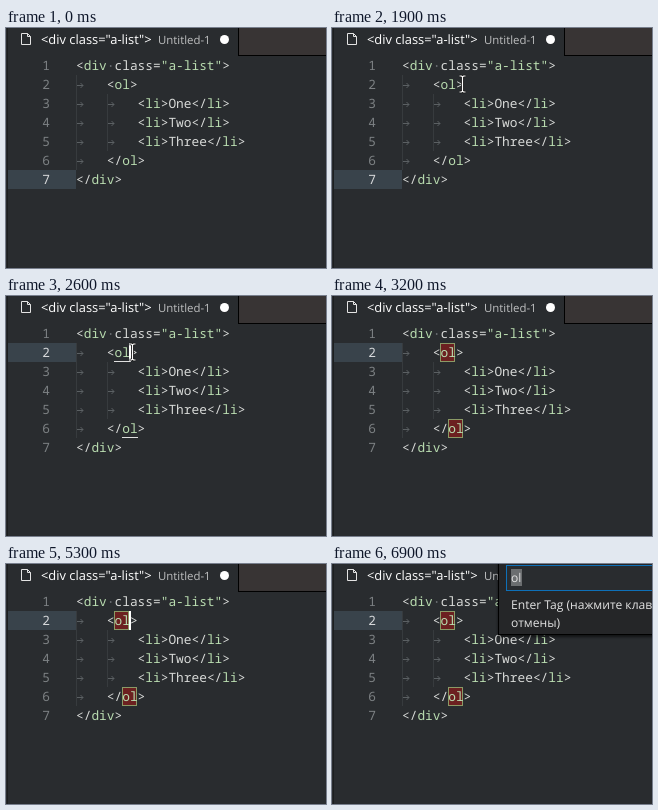
Write an HTML page that moves like this. It is 320x240 px and loops after 8 s.

```html
<!DOCTYPE html>
<html lang="en">
<head>
<meta charset="utf-8">
<title>Rename paired tag</title>
<style>
  html, body { margin: 0; width: 100%; height: 100%; overflow: hidden; background: #292c2f; }
  svg { display: block; width: 320px; height: 240px; }
  text { white-space: pre; text-rendering: geometricPrecision; }
  rect { shape-rendering: crispEdges; }
  .ui { font-family: "Open Sans", "Noto Sans", sans-serif; fill: #e2e2e2; }
  .code { font: 12.83px "Noto Sans Mono", "DejaVu Sans Mono", monospace; fill: #d8dad8; }
  .code .tag { fill: #b9dcb0; }
  .code.num { fill: #7c8083; text-anchor: end; }
  .code.num.on { fill: #d6d8da; }
  .guide { fill: #373b3e; }
  .ws { fill: none; stroke: #5b6063; }
</style>
</head>
<body>
<svg id="stage" viewBox="0 0 320 240">
  <defs>
    <filter id="shadow" x="-10%" y="-20%" width="120%" height="150%">
      <feDropShadow dx="0" dy="2" stdDeviation="1.8" flood-color="#000" flood-opacity=".6"/>
    </filter>
    <path id="beamShape" d="M-3 -8H-1L0 -7L1 -8H3M0 -7V7M-3 8H-1L0 7L1 8H3"/>
  </defs>
  <rect width="320" height="240" fill="#292c2f"/>
  <rect x="1" width="1" height="240" fill="#1c1e20"/>

  <g id="tabs">
    <rect x="232" width="88" height="28" fill="#000"/>
    <rect x="233" width="87" height="27" fill="#383434"/>
    <path d="M15.5 5.5H21.5L24.5 8.5V16.5H15.5ZM21.5 5.5V8.5H24.5" fill="none" stroke="#e4e4e4"/>
    <text class="ui" x="35" y="16" font-size="12.9" style="fill:#fff">&lt;div class="a-list"&gt;</text>
    <text class="ui" x="152" y="16" font-size="11.4" style="fill:#bfc0c1">Untitled-1</text>
    <circle cx="218.5" cy="11.5" r="4.5" fill="#fff"/>
  </g>

  <rect id="active" x="2" width="68" height="19" fill="#39434b"/>
  <g id="marks"></g>
  <g id="editor"></g>
  <rect id="caret" width="2" height="19" fill="#fff"/>

  <g id="hover">
    <rect x="108" y="66" width="230" height="94" fill="#8a8b8c"/>
    <rect x="109" y="67" width="230" height="92" fill="#252628"/>
    <g class="ui" font-size="13.15">
      <text x="117" y="86">The ol element represents a list of items</text>
      <text x="117" y="105">ordered, such that changing the order</text>
      <text x="117" y="124">document.</text>
      <text x="117" y="151" style="fill:#3794ff">HWQ Reference</text>
    </g>
  </g>

  <g id="prompt">
    <rect x="166" y="-10" width="180" height="81" fill="#000" filter="url(#shadow)"/>
    <rect x="167" y="-10" width="180" height="80" fill="#252628"/>
    <rect x="174" y="1" width="160" height="26" fill="#0e70b8"/>
    <rect x="175" y="2" width="160" height="24" fill="#292c2f"/>
    <rect x="179" y="5" width="11" height="17" fill="#6b6e70"/>
    <g class="ui" font-size="12.1">
      <text x="179" y="18">ol</text>
      <text x="179" y="45">Enter Tag (нажмите клавишу</text>
      <text x="179" y="63">отмены)</text>
    </g>
  </g>

  <path id="arrow" d="M0 0V15L3.5 11.8L5.8 17L8 16L5.8 11H10.5Z" fill="#fff" stroke="#111" stroke-width=".8"/>
  <g id="beam" fill="none">
    <use href="#beamShape" stroke="#111" stroke-width="2.6"/>
    <use href="#beamShape" stroke="#fff" stroke-width="1.2"/>
  </g>
</svg>
<script>
const LOOP = 8000, LEFT = 70, CHAR = 7.7, ROW = 19;
const $ = id => document.getElementById(id);
const rowTop = row => 28 + (row - 1) * ROW;

function add(parent, name, attrs, text = "") {
  const node = document.createElementNS("http://www.w3.org/2000/svg", name);
  for (const key in attrs) node.setAttribute(key, attrs[key]);
  node.textContent = text;
  return parent.appendChild(node);
}

const editor = $("editor");
const lines = [
  [0, '<div class="a-list">'],
  [1, "<ol>"],
  [2, "<li>One</li>"],
  [2, "<li>Two</li>"],
  [2, "<li>Three</li>"],
  [1, "</ol>"],
  [0, "</div>"]
];

const numbers = lines.map(([depth, source], i) => {
  const top = rowTop(i + 1), base = top + 14;
  for (let d = 0; d < depth; d++) {
    const x = Math.round(LEFT + d * 4 * CHAR);
    add(editor, "rect", { class: "guide", x, y: top, width: 1, height: ROW });
    add(editor, "path", { class: "ws", d: `M${x + 1} ${top + 10.5}h6m-2.5 -2.5l2.5 2.5l-2.5 2.5` });
  }
  const line = add(editor, "text", { class: "code", x: LEFT + depth * 4 * CHAR, y: base });
  source.split(/(\b(?:div|ol|li)\b|"a-list")/).forEach((part, k) =>
    add(line, "tspan", k % 2 ? { class: "tag" } : {}, part));
  return add(editor, "text", { class: "code num", x: 44, y: base }, i + 1);
});
add(editor, "circle", { cx: 104.7, cy: 38, r: 0.9, fill: "#6a6f73" });

// Opening and closing tag names: underlined first, then boxed
const marks = $("marks");
const pairs = [[108, 2], [116, 6]];
const lineMarks = add(marks, "g", { fill: "#e0e0e0" });
const boxMarks = add(marks, "g", { fill: "#6c2020", stroke: "#8b9a66" });
for (const [x, row] of pairs) {
  const y = rowTop(row);
  add(lineMarks, "rect", { x, y: y + 18, width: 16, height: 1 });
  add(boxMarks, "rect", { x: x + .5, y: y + .5, width: 14, height: 18 });
}

// Pointer steps: time, x, y, shape
const pointer = [
  [0], [800, 33, -8, "arrow"], [900, 37, 2, "arrow"], [1000, 48, 12, "arrow"],
  [1100, 66, 22, "arrow"], [1200, 88, 36, "beam"], [1300, 107, 46, "beam"],
  [1400, 121, 53, "beam"], [1500, 129, 57, "beam"], [1600, 132, 57, "beam"],
  [1900, 130.5, 56, "beam"], [2000, 126.5, 56, "beam"], [2900, 128, 65, "beam"],
  [3000, 135, 92, "beam"], [3100, 143, 128, "beam"], [3200]
];
const hover = [[0, 0], [2000, .5], [2100, 1], [2600, 0]];
const caret = [
  [0, 0], [2400, 1], [3100, 0], [3500, 1], [3900, 0], [4400, 1],
  [4900, 0], [5300, 1], [5800, 0], [6200, 1], [6700, 0]
];

const at = (steps, t) => steps.findLast(step => step[0] <= t);
const show = (node, on) => node.setAttribute("opacity", Number(on));

function draw(t) {
  const clicked = t >= 2600, row = clicked ? 2 : 7;
  $("active").setAttribute("y", rowTop(row));
  numbers.forEach((n, i) => n.classList.toggle("on", i + 1 === row));

  $("caret").setAttribute("x", clicked ? 123 : 115);
  $("caret").setAttribute("y", rowTop(row));
  show($("caret"), at(caret, t)[1]);

  show(lineMarks, clicked && t < 2700);
  show(boxMarks, t >= 2700);
  show($("hover"), at(hover, t)[1]);
  show($("prompt"), t >= 6900);

  const [, x = 0, y = 0, shape] = at(pointer, t);
  for (const id of ["arrow", "beam"]) {
    show($(id), id === shape);
    $(id).setAttribute("transform", `translate(${x} ${y})`);
  }
}

const start = performance.now();
function tick() {
  draw((performance.now() - start) % LOOP);
  requestAnimationFrame(tick);
}
tick();
</script>
</body>
</html>
```
